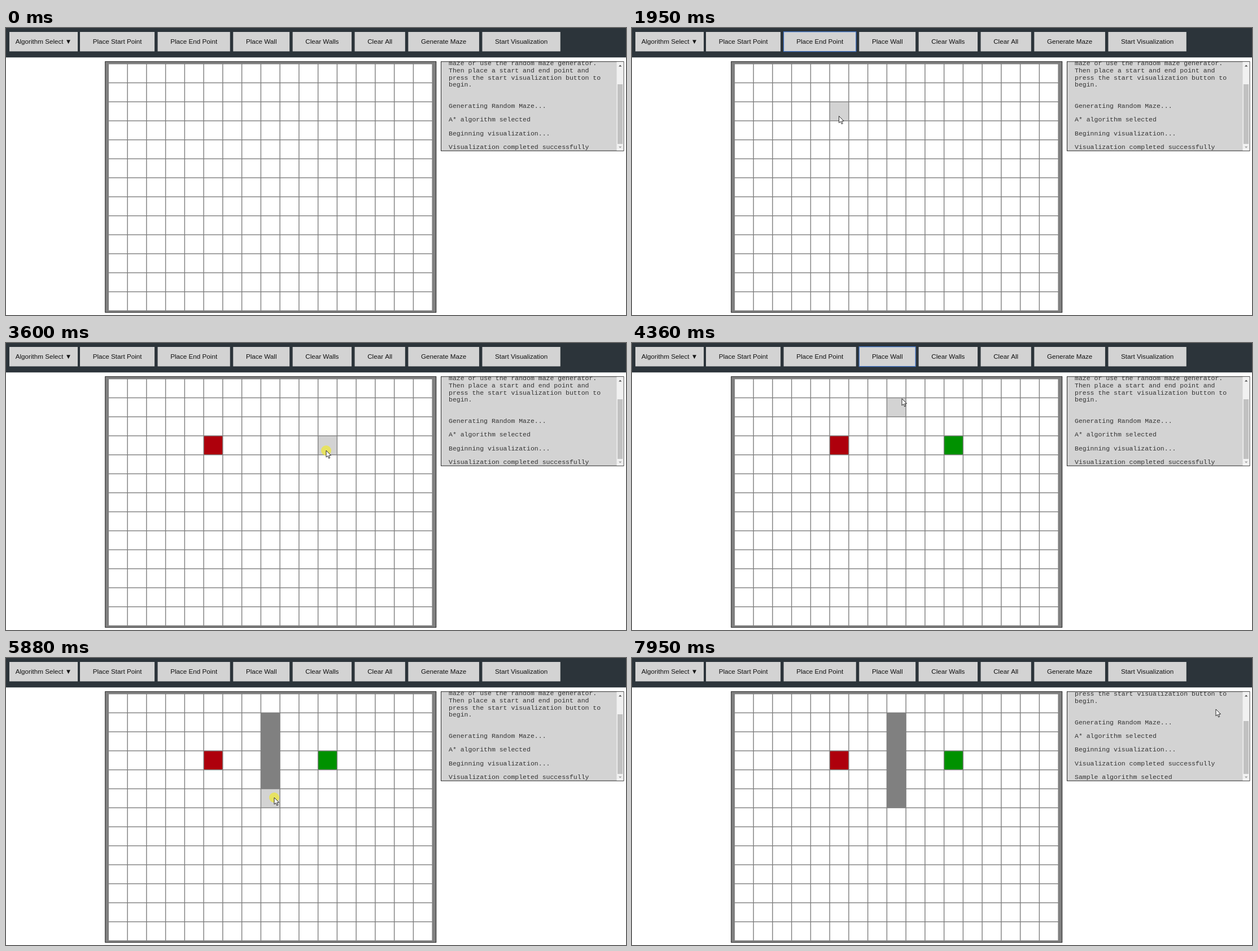
Write an HTML page with a canvas that moves like this. It is 1098 by 510 pixels and loops after 8000 ms.

```html
<!DOCTYPE html>
<html lang="en">
<head>
<meta charset="utf-8">
<title>Pathfinding visualizer</title>
<style>
html, body { margin: 0; width: 100%; height: 100%; overflow: hidden; background: #fff; }
canvas { display: block; }
</style>
</head>
<body>
<canvas id="stage" width="1098" height="510"></canvas>
<script>
const ctx = document.getElementById('stage').getContext('2d');
const LOOP = 8000, HOLD = 80;
const LIGHT = '#d3d3d3', GRAY = '#808080', RED = '#ae000c', GREEN = '#009100';
const UI_FONT = '11.67px "Liberation Sans", Arial, sans-serif';
const LOG_FONT = '11.5px "Liberation Mono", "Courier New", monospace';
const grid = { x: 182.1, y: 64.4, pitch: 33.75, size: 32.3, cols: 17, rows: 13 };
const menu = { x: 6, y: 42, w: 140, row: 29.7, items: ['Dijkstra', 'A*', 'Sample'] };

const intro = [
  'maze or use the random maze generator.',
  'Then place a start and end point and',
  'press the start visualization button to',
  'begin.'
];
const messages = [
  'Generating Random Maze...',
  'A* algorithm selected',
  'Beginning visualization...',
  'Visualization completed successfully',
  'Sample algorithm selected'
];

// The toolbar flows from left to right; the colour is used for hovering and placing.
ctx.font = UI_FONT;
let edge = 131;
const buttons = [{ label: 'Algorithm Select ▼', color: '#a9a9a9', left: 6, right: 127 }];
for (const [label, color] of [
  ['Place Start Point', GREEN], ['Place End Point', RED], ['Place Wall', GRAY],
  ['Clear Walls', LIGHT], ['Clear All', LIGHT], ['Generate Maze', LIGHT], ['Start Visualization', LIGHT]
]) {
  const right = edge + ctx.measureText(label).width + 45.25;
  buttons.push({ label, color, left: edge, right });
  edge = right + 5.5;
}

// Pointer script
const stops = [], clicks = [];
const go = (t, x, y) => stops.push({ t, x, y });
const wait = t => stops.push({ ...stops[stops.length - 1], t });
function click(arrive, press, x, y) {
  go(arrive, x, y);
  wait(press + HOLD);
  clicks.push({ press, release: press + HOLD, x, y });
}

go(350, 968, 435);
go(600, 610, 215);
go(860, 228, 4);
click(1060, 1200, 302, 26);
wait(1670);
go(2080, 391, 206);
click(2300, 2350, 366, 180);
wait(2490);
click(2750, 2880, 236, 21);
go(3270, 540, 180);
click(3410, 3550, 567, 191);
click(3900, 3920, 470, 24);
go(4360, 478, 99);
go(4480, 478, 88);
for (let i = 0; i < 4; i++) click(4740 + 213 * i, 4840 + 213 * i, 478 - i, 121 + 32 * i);
wait(5680);
click(5840, 5840, 475, 248);
go(6490, 178, 52);
go(6640, 135, 40);
go(6800, 98, 30);
click(7250, 7570, 84, 114);
wait(7790);
go(7950, 1034, 91);

function pointerAt(t) {
  if (t < stops[0].t) return null;
  const next = stops.findIndex(s => s.t > t);
  if (next < 0) return stops[stops.length - 1];
  const a = stops[next - 1], b = stops[next];
  const u = (t - a.t) / (b.t - a.t), k = (u + u * u * (3 - 2 * u)) / 2;
  return { x: a.x + (b.x - a.x) * k, y: a.y + (b.y - a.y) * k };
}

const buttonAt = p => buttons.find(b => p.x >= b.left && p.x < b.right && p.y >= 7 && p.y < 42);

function cellAt(p) {
  const c = Math.floor((p.x - grid.x) / grid.pitch), r = Math.floor((p.y - grid.y) / grid.pitch);
  return c >= 0 && c < grid.cols && r >= 0 && r < grid.rows ? c + ',' + r : null;
}

function menuRowAt(p) {
  const row = Math.floor((p.y - menu.y) / menu.row);
  return p.x >= menu.x && p.x < menu.x + menu.w && row < menu.items.length ? row : -1;
}

// Replays every click made so far.
function stateAt(t) {
  const state = { cells: {}, focus: null, selected: false, pressed: false };
  let color;
  for (const c of clicks.filter(c => c.press <= t)) {
    const done = c.release <= t, cell = cellAt(c);
    state.pressed = !done;
    state.focus = buttonAt(c);
    if (state.focus) color = state.focus.color;
    else if (cell && done) state.cells[cell] = color;
    else if (done) state.selected = true;
  }
  return state;
}

function rect(x, y, w, h, fill) {
  ctx.fillStyle = fill;
  ctx.fillRect(x, y, w, h);
}

function panel(x, y, w, h, fill) {
  rect(x, y, w, h, '#111');
  rect(x + 0.9, y + 0.9, w - 1.8, h - 1.8, fill);
}

function text(str, x, y, font, color = '#111') {
  ctx.font = font;
  ctx.fillStyle = color;
  ctx.fillText(str, x, y);
}

function drawHeader(hovered, focus) {
  rect(0, 0, 1098, 52.3, '#2c343a');
  for (const b of buttons) {
    const width = b.right - b.left;
    rect(b.left, 7, width, 34.5, b === hovered ? b.color : LIGHT);
    if (b === focus) {
      ctx.strokeStyle = '#3f73c8';
      ctx.lineWidth = 1.2;
      ctx.strokeRect(b.left, 6.7, width, 35);
    }
    ctx.textAlign = 'center';
    text(b.label, b.left + width / 2, 28, UI_FONT);
    ctx.textAlign = 'left';
  }
}

function drawGrid(cells, hovered) {
  panel(175.2, 59.2, 587, 446.6, GRAY);
  for (let r = 0; r < grid.rows; r++) {
    for (let c = 0; c < grid.cols; c++) {
      const key = c + ',' + r;
      const fill = cells[key] || (key === hovered ? LIGHT : '#fff');
      if (fill !== GRAY) rect(grid.x + c * grid.pitch, grid.y + r * grid.pitch, grid.size, grid.size, fill);
    }
  }
}

function drawLog(scrolled) {
  const shift = scrolled ? 24.4 : 0, thumb = scrolled ? 112 : 100;
  panel(770, 59.3, 324.4, 159.4, LIGHT);
  ctx.save();
  ctx.beginPath();
  ctx.rect(771, 60, 310, 158);
  ctx.clip();
  intro.forEach((line, i) => text(line, 784, 65.7 + 12.9 * i - shift, LOG_FONT, '#333'));
  messages.forEach((line, i) => text(line, 784, 142 + 24.4 * i - shift, LOG_FONT, '#333'));
  ctx.restore();
  rect(1081.5, 60.2, 12, 157.6, '#f1f1f1');
  rect(1083, thumb, 9, 206 - thumb, '#c1c1c1');
  ctx.fillStyle = '#505050';
  ctx.fill(new Path2D('M1085 68.5h5.4l-2.7-3z'));
  ctx.fillStyle = '#a3a3a3';
  ctx.fill(new Path2D('M1085 210.5h5.4l-2.7 3z'));
}

function drawMenu(active) {
  const { x, y, w, row, items } = menu;
  ctx.save();
  ctx.shadowColor = 'rgba(0,0,0,.2)';
  ctx.shadowBlur = 14;
  ctx.shadowOffsetY = 7;
  rect(x, y, w, row * items.length, '#f1f1f1');
  ctx.restore();
  items.forEach((item, i) => {
    if (i === active) rect(x, y + i * row, w, row, '#ddd');
    text(item, x + 14, y + i * row + 19, UI_FONT);
  });
}

const ARROW = new Path2D('M0 0V12L2.8 9.5L4.7 14L6.6 13.2L4.8 8.9L8.5 8.7Z');
const HAND = new Path2D('M-1.2 9.5V1Q0-1 1.4 1V5Q7.4 5 7.4 8V11.5L6 14V17H-.5V14.5L-4.2 10Q-4 7-1.2 9.5Z');

function drawPointer(p, hand, pressed) {
  ctx.save();
  ctx.translate(p.x, p.y);
  if (pressed) {
    ctx.fillStyle = 'rgba(236,230,70,.8)';
    ctx.beginPath();
    ctx.arc(0, 0, 9, 0, 7);
    ctx.fill();
  }
  const shape = hand ? HAND : ARROW;
  ctx.fillStyle = '#fff';
  ctx.strokeStyle = '#111';
  ctx.lineWidth = 0.9;
  ctx.lineJoin = 'round';
  ctx.fill(shape);
  ctx.stroke(shape);
  ctx.restore();
}

function draw(t) {
  const pointer = pointerAt(t), state = stateAt(t);
  const button = pointer && buttonAt(pointer);
  const row = pointer ? menuRowAt(pointer) : -1;
  const open = button === buttons[0] || row >= 0;
  rect(0, 0, 1098, 510, '#fff');
  drawHeader(open ? buttons[0] : button, state.focus);
  drawGrid(state.cells, pointer && cellAt(pointer));
  drawLog(state.selected);
  if (open) drawMenu(row);
  if (pointer) drawPointer(pointer, button || row >= 0, state.pressed);
}

const start = performance.now();
function tick() {
  draw((performance.now() - start) % LOOP);
  requestAnimationFrame(tick);
}
tick();
</script>
</body>
</html>
```
